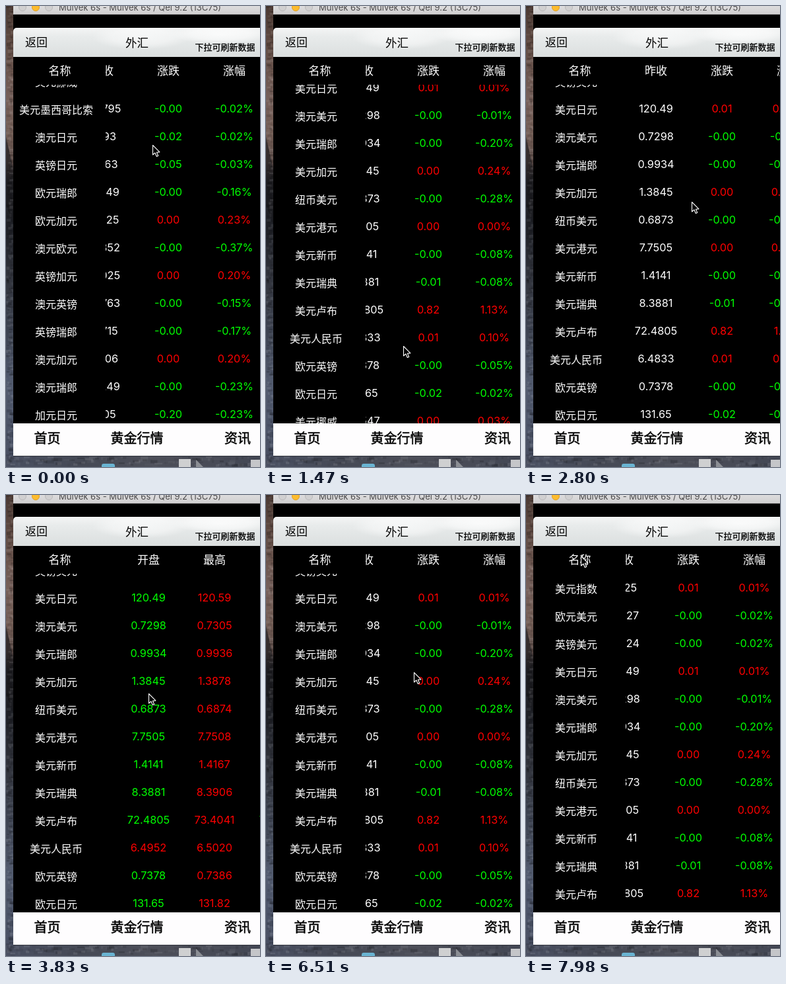
Recreate the animation shown at these times as an HTML page with a canvas. Size 385 by 697 pixels, loop 8000 ms.

```html
<!DOCTYPE html>
<html lang="zh-CN">
<head>
<meta charset="utf-8">
<title>外汇</title>
<style>
html, body { margin: 0; width: 385px; height: 697px; overflow: hidden; background: #000; }
canvas { display: block; width: 385px; height: 697px; }
</style>
</head>
<body>
<canvas id="stage" width="385" height="697"></canvas>
<script>
const W = 385, H = 697, LOOP = 8000, TICK = 147.7;
const LEFT = 11, SPLIT = 151, TOP = 119, BOTTOM = 631, ROW = 42;
const RED = '#ff0000', GREEN = '#00ff00';
const CJK = '"Noto Sans CJK SC", "Noto Sans CJK", "Noto Sans CJK JP", sans-serif';
const LATIN = 'Inter, "Liberation Sans", sans-serif';
const canvas = document.getElementById('stage');
const ctx = canvas.getContext('2d');

// name, previous close, percent change, high, low, open
const rows = `美元指数 98.25 .01
欧元美元 1.0827 -.02
英镑美元 1.4224 -.02
美元日元 120.49 .01 120.59 120.37
澳元美元 0.7298 -.01 0.7305 0.7273
美元瑞郎 0.9934 -.20 0.9936 0.9904
美元加元 1.3845 .24 1.3878 1.3831
纽币美元 0.6873 -.28 0.6874 0.6840
美元港元 7.7505 0 7.7508 7.7504
美元新币 1.4141 -.08 1.4167 1.4112
美元瑞典 8.3881 -.08 8.3906 8.3401
美元卢布 72.4805 1.13 73.4041 72.4805
美元人民币 6.4833 .10 6.5020 6.4833 6.4952
欧元英镑 0.7378 -.05 0.7386 0.7366
欧元日元 131.65 -.018 131.82 131.57
美元挪威 8.8547 .03
美元墨西哥比索 17.7795 -.02
澳元日元 87.93 -.02
英镑日元 171.63 -.03
欧元瑞郎 1.0849 -.16
欧元加元 1.5025 .23
澳元欧元 0.6852 -.37
英镑加元 2.0025 .20
澳元英镑 0.4763 -.15
英镑瑞郎 1.4715 -.17
澳元加元 1.0106 .20
澳元瑞郎 0.7249 -.23
加元日元 87.05 -.23`.split('\n').map(line => {
  const [name, close, pct, high = '', low = '', open = close] = line.split(' ');
  const digits = close.split('.')[1].length;
  const tone = pct < 0 ? GREEN : RED;
  return { name, cells: [
    [(close * (1 + pct / 100)).toFixed(digits), tone],
    [open, +open > +close ? RED : GREEN],
    [high, RED],
    [low, GREEN],
    [close, '#fff'],
    [(close * pct / 100).toFixed(2), tone],
    [(+pct).toFixed(2) + '%', tone]
  ] };
});
const heads = ['最新', '开盘', '最高', '最低', '昨收', '涨跌', '涨幅'];

// Pointer stops: tick, x, y
const path = [
  [0, 222, 210], [3.4, 208, 514], [11, 208, 514], [17, 200, 298], [18, 200, 298],
  [19, 251, 296], [20, 334, 295], [22, 330, 298], [26, 216, 300], [28, 322, 296],
  [29, 334, 292], [34, 309, 246], [35, 309, 246], [36, 248, 246], [37, 163, 246],
  [38, 73, 246], [40, 82, 250], [44, 224, 268], [45, 222, 304], [46, 220, 364],
  [47, 216, 430], [49, 208, 430], [51, 152, 230], [53, 96, 108], [54, 83, 92]
];

function key(stops, k, col = 1) {
  let i = 1;
  while (i < stops.length - 1 && k > stops[i][0]) i++;
  const a = stops[i - 1], b = stops[i];
  const f = Math.min(1, Math.max(0, (k - a[0]) / (b[0] - a[0])));
  return a[col] + (b[col] - a[col]) * f;
}

// Momentum after letting go: exponential slowdown that ends at k1
function coast(from, to, k0, k1, k) {
  if (k >= k1) return to;
  const c = Math.exp((k0 - k1) / 3.5);
  return to + (from - to) * (Math.exp((k0 - k) / 3.5) - c) / (1 - c);
}

function scrollY(k) {
  if (k < 3.4) return key([[0, 657], [3.4, 353]], k);
  if (k < 44) return coast(353, 111, 3.4, 17, k);
  return key([[44, 111], [45, 75], [46, 15], [47, -36], [48, -50],
    [49, -34], [50, -17], [51, -7], [52, 0]], k);
}

// Centre of the second column
function columnX(k) {
  if (k < 20) return key([[18, -154], [19, -103], [20, -20]], k);
  if (k < 26) return coast(-20, 216, 20, 26, k);
  if (k < 38) return key([[26, 216], [28, 317], [29, 320], [31, 311], [35, 311],
    [36, 250], [37, 165], [38, 75]], k);
  const x = 75 - 400 * (1 - Math.exp((38 - k) / 3.5));
  if (x > -154) return x;
  const u = k - 40.97;
  return -154 - 49 * u * Math.exp(-u / 0.5);
}

function text(c, str, x, y, size, color, opt = {}) {
  const latin = opt.latin;
  c.font = `400 ${size}px ${latin ? LATIN : CJK}`;
  c.textAlign = opt.align || 'center';
  c.fillStyle = color;
  const base = y + size * (latin ? 0.364 : 0.38);
  c.fillText(str, x, base);
  if (opt.thick) {
    c.strokeStyle = color;
    c.lineWidth = opt.thick;
    c.strokeText(str, x, base);
  }
}

function fade(c, x0, y0, x1, y1, stops) {
  const g = c.createLinearGradient(x0, y0, x1, y1);
  stops.forEach(([p, color]) => g.addColorStop(p, color));
  return g;
}

function rect(c, x, y, w, h, color) {
  c.fillStyle = color;
  c.fillRect(x, y, w, h);
}

function disc(c, x, y, r, color, edge) {
  c.beginPath();
  c.arc(x, y, r, 0, Math.PI * 2);
  c.fillStyle = color;
  c.fill();
  c.strokeStyle = edge;
  c.lineWidth = 1;
  c.stroke();
}

function glow(c, x, y, rx, ry, alpha) {
  c.save();
  c.translate(x, y);
  c.scale(rx, ry);
  const g = c.createRadialGradient(0, 0, 0, 0, 0, 1);
  g.addColorStop(0, `rgba(255,255,255,${alpha})`);
  g.addColorStop(0.6, `rgba(255,255,255,${alpha * 0.7})`);
  g.addColorStop(1, 'rgba(255,255,255,0)');
  rect(c, -1, -1, 2, 2, g);
  c.restore();
}

function desktop(c) {
  rect(c, 0, 0, LEFT, H, fade(c, 0, 0, 0, H, [
    [0, '#4b3a34'], [0.08, '#5f4a42'], [0.2, '#76605a'], [0.28, '#6f5a52'],
    [0.34, '#5a4a46'], [0.38, '#26262b'], [0.48, '#1e2026'], [0.6, '#33363f'],
    [0.7, '#3c4250'], [0.82, '#525b6f'], [0.92, '#4c5468'], [1, '#454b5d']]));
  // Slanted shadow under the ridge
  c.fillStyle = 'rgba(24,24,28,0.6)';
  c.beginPath();
  [[0, 198], [LEFT, 246], [LEFT, 330], [0, 300]].forEach(p => c.lineTo(...p));
  c.fill();
  rect(c, 0, 680, W, 17, fade(c, 0, 0, W, 0, [
    [0, '#4b5163'], [0.3, '#454955'], [0.6, '#4d4f59'], [1, '#434754']]));
  let seed = 7;
  const rnd = () => (seed = seed * 16807 % 2147483647) / 2147483647;
  const speck = (x, y, w, h) => rect(c, x, y, w, h,
    rnd() < 0.55 ? `rgba(0,0,0,${rnd() * 0.2})` : `rgba(255,255,255,${rnd() * 0.1})`);
  for (let y = 0; y < H; y += 2) speck(rnd() * 8, y, 2 + rnd() * 6, 2 + rnd() * 3);
  for (let x = 0; x < W; x += 3) speck(x, 680 + rnd() * 13, 3 + rnd() * 10, 2 + rnd() * 3);
  rect(c, LEFT, 680, W, 1, '#33363f');
  c.fillStyle = '#69b4d2';
  c.beginPath();
  c.roundRect(145, 692, 20, 8, 3);
  c.fill();
  rect(c, 262, 685, 18, 12, '#cfd0d1');
  c.fillStyle = '#8b8e94';
  c.beginPath();
  c.moveTo(288, 686);
  c.lineTo(299, 697);
  c.lineTo(288, 697);
  c.fill();
  rect(c, 371, 686, 14, 11, '#c5c6c9');
}

function chrome(c) {
  rect(c, LEFT, 0, W, 13, fade(c, 0, 0, 0, 13, [[0, '#dddcdd'], [1, '#cfcecf']]));
  rect(c, LEFT, 12, W, 1, '#aaa9aa');
  disc(c, 25, 2, 5.5, '#d0cfd0', '#b9b8b9');
  disc(c, 45, 2, 5.5, '#fdbc2e', '#e0a127');
  disc(c, 65, 2, 5.5, '#d0cfd0', '#b9b8b9');
  text(c, 'Mulvek 6s - Mulvek 6s / Qel 9.2 (13C75)', 80, 2.3, 13, '#4b4a4b',
    { latin: true, align: 'left' });
}

function bars(c) {
  c.save();
  c.beginPath();
  c.roundRect(LEFT, 33, W, 44, [5, 0, 0, 0]);
  c.clip();
  rect(c, LEFT, 33, W, 44, fade(c, 0, 33, 0, 77, [
    [0, '#f4f5f5'], [0.3, '#e8ebeb'], [1, '#dbdfdf']]));
  glow(c, 205, 47, 75, 19, 0.6);
  glow(c, 325, 43, 75, 14, 0.75);
  c.restore();
  text(c, '返回', 46, 55, 17, '#000');
  text(c, '外汇', 198.5, 55, 17.5, '#000');
  text(c, '下拉可刷新数据', 332, 62, 13, '#000', { thick: 0.3 });
  rect(c, LEFT, BOTTOM, W, 49, '#fefdfe');
  text(c, '首页', 62.5, 653.5, 20, '#000', { thick: 0.5 });
  text(c, '黄金行情', 198.5, 653.5, 20, '#000', { thick: 0.5 });
  text(c, '资讯', 351, 653.5, 20, '#000', { thick: 0.5 });
}

const back = document.createElement('canvas');
back.width = W;
back.height = H;
{
  const c = back.getContext('2d');
  desktop(c);
  rect(c, LEFT, 13, W, BOTTOM - 13, '#000');
  chrome(c);
  bars(c);
  text(c, '名称', 81.5, 98, 17, '#fff');
}

function clipped(x, y, w, h, paint) {
  ctx.save();
  ctx.beginPath();
  ctx.rect(x, y, w, h);
  ctx.clip();
  paint();
  ctx.restore();
}

function pointer(x, y) {
  const pts = [[0, 0], [0, 14.5], [3.4, 11.5], [5.8, 17], [8.2, 16], [5.9, 10.7], [10.4, 10.4]];
  ctx.beginPath();
  pts.forEach(([dx, dy]) => ctx.lineTo(x + 0.5 + dx, y + 0.5 + dy));
  ctx.closePath();
  ctx.fillStyle = '#000';
  ctx.fill();
  ctx.strokeStyle = '#fff';
  ctx.lineWidth = 1.1;
  ctx.lineJoin = 'round';
  ctx.stroke();
}

function draw(k) {
  const sy = Math.round(scrollY(k)), px = Math.round(columnX(k));
  const colX = i => px + (i - 1) * 100;
  const seen = rows.map((row, i) => ({ row, y: 140 + i * ROW - sy }))
    .filter(({ y }) => y > TOP - 20 && y < BOTTOM + 20);
  ctx.drawImage(back, 0, 0);
  clipped(LEFT, TOP, W, BOTTOM - TOP, () => {
    for (const { row, y } of seen) text(ctx, row.name, 76, y + 1.5, 16, '#fff');
  });
  clipped(SPLIT, 78, W, TOP - 78, () => {
    heads.forEach((head, i) => text(ctx, head, colX(i), 98, 17, '#fff'));
  });
  clipped(SPLIT, TOP, W, BOTTOM - TOP, () => {
    for (const { row, y } of seen) {
      row.cells.forEach(([str, color], i) =>
        text(ctx, str, colX(i), y, 16.3, color, { latin: true }));
    }
  });
  pointer(Math.round(key(path, k)), Math.round(key(path, k, 2)));
}

let start, last = -1;
function frame(now) {
  if (start === undefined) start = now;
  // The screen refreshes in steps of one tick
  const k = Math.floor(((now - start) % LOOP + 13) / TICK);
  if (k !== last) draw(last = k);
  requestAnimationFrame(frame);
}
draw(0);
requestAnimationFrame(frame);
</script>
</body>
</html>
```
